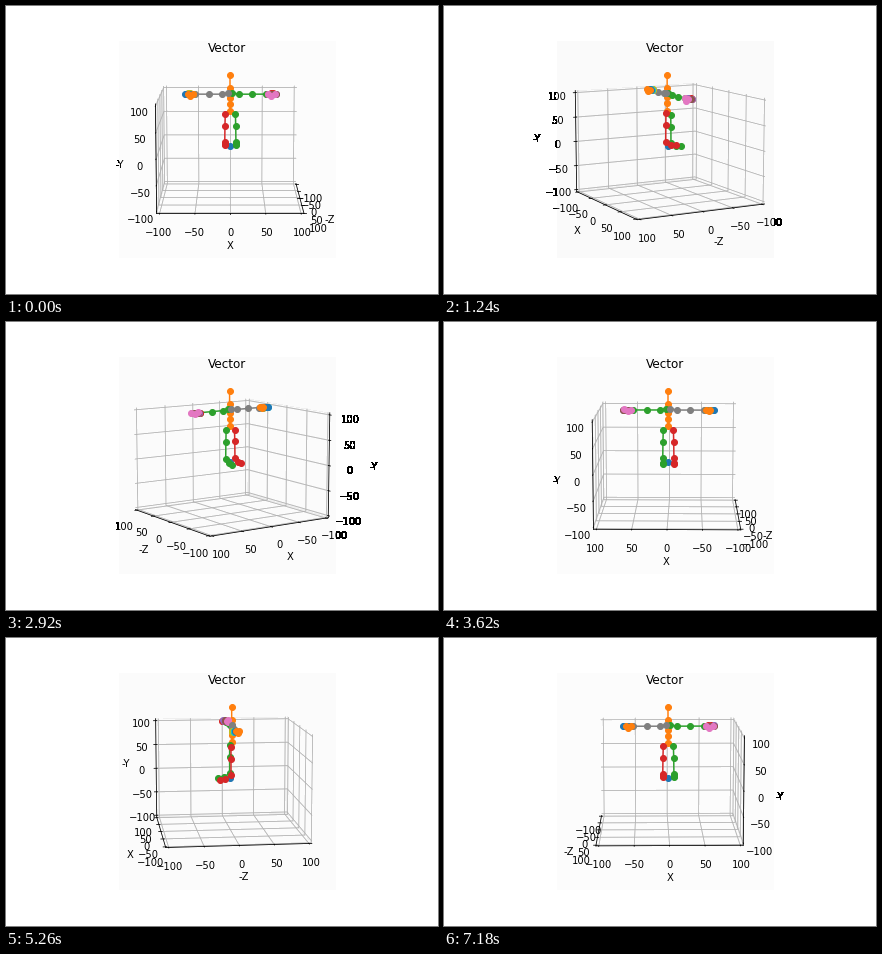
A matplotlib script for the animation above (7.2 s loop, 432 by 288 pixels).

```python
import numpy as np
import matplotlib.pyplot as plt
from matplotlib.animation import FuncAnimation
from matplotlib.artist import Artist

W, H, DPI = 432, 288, 72
FRAMES, STEP = 360, 20
ELEV = 10
LIM = 100 * 25 / 24  # tick range plus a small margin
BOX = (slice(35, 252), slice(113, 330))  # pixel rows and columns of the axes


class FlatTones(Artist):
    """Solid black lettering outside the axes, one even light tone inside."""

    def draw(self, renderer):
        if not hasattr(renderer, "buffer_rgba"):
            return
        rgb = np.asarray(renderer.buffer_rgba())[..., :3]
        low = rgb.min(axis=-1)
        ink = low < 254
        ink[BOX] = False
        rgb[ink] = 0
        panel, light = rgb[BOX], low[BOX] >= 240
        if light.any():
            panel[light] = panel[light].mean(axis=0).round().astype(np.uint8)


plt.rcParams.update({"font.family": "DejaVu Sans", "font.size": 10})
fig = plt.figure(figsize=(W / DPI, H / DPI), dpi=DPI, facecolor="white")
fig.subplots_adjust(left=0.125, right=0.9, bottom=0.125, top=0.88)
ax = fig.add_subplot(projection="3d")
ax.set(xlim=(-LIM, LIM), ylim=(-LIM, LIM), zlim=(-LIM, LIM),
       xlabel="-Z", ylabel="X", zlabel="-Y")
ax.set_title("Vector", y=1.0, fontsize=12)
for axis in (ax.xaxis, ax.yaxis, ax.zaxis):
    axis.set_ticks(range(-100, 101, 50))
fig.add_artist(FlatTones()).set_zorder(99)


def chain(color, points, side=1):
    """Joined joints given as (across, up, depth)."""
    x, y, z = np.array(points, float).T
    ax.plot(z, side * x, y, "o-", color=color)


def leg(color, side):
    chain(color, [(7.5, 65, 0), (8, 41, 0), (8.3, 8, 0),
                  (8.3, 1, -9), (8.3, 0, -17)], side)


def arm(first, side, tips, last_tip):
    chain(f"C{first}", [(3, 107, 2), (13, 104.5, 1), (32, 104.5, 1),
                        (52.5, 104.5, 0.5)], side)
    for k, (tip, depth) in enumerate(zip(tips, (-5, -3, -0.5)), 1):
        chain(f"C{(first + k) % 10}",
              [(56, 104.5, depth * 0.7), ((56 + tip) / 2, 105, depth * 0.9),
               (tip, 105, depth)], side)
    chain(f"C{(first + 4) % 10}",
          [(55.5, 105, 2), (60, 101.5, 3), (last_tip, 105, 4.2)], side)


chain("C0", [(0, 0, 0)])
chain("C1", [(0, y, 2) for y in (72, 86, 98, 107, 117, 142)])
leg("C2", 1)
leg("C3", -1)
arm(2, 1, (63, 67, 67), 66.5)
arm(7, -1, (63, 66, 67.5), 62)


def update(i):
    # a hair past zero keeps the first view on the rising side
    ax.view_init(elev=ELEV, azim=i or 1e-3)
    return []


anim = FuncAnimation(fig, update, frames=FRAMES, interval=STEP,
                     init_func=lambda: update(0), repeat=True,
                     repeat_delay=0, cache_frame_data=False)
plt.show()
```
